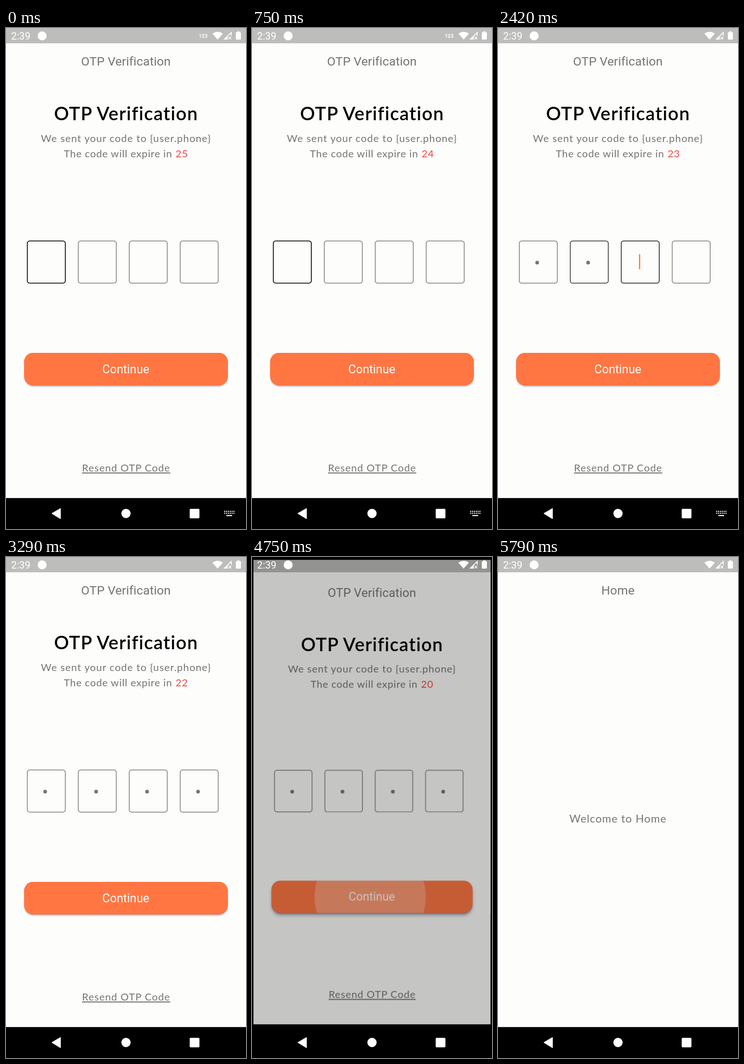
Animation, 518 px wide and 1081 px high, one loop 5.89 s. Source, as an HTML page:

```html
<!DOCTYPE html>
<html lang="en">
<head>
<meta charset="utf-8">
<title>OTP Verification</title>
<style>
html, body { margin: 0; width: 100%; height: 100%; overflow: hidden; background: #000; }
svg { display: block; width: 100%; height: 100%; }

text { fill: #757575; text-anchor: middle; }
.bar { font: 400 26.5px Roboto, sans-serif; letter-spacing: .12px; }
.head { font: 600 40px Lato, sans-serif; letter-spacing: 1.32px; fill: #000; }
.body { font: 400 22px Lato, sans-serif; letter-spacing: 1.1px; }
.body.start { text-anchor: start; letter-spacing: .82px; }
.count text { fill: #f44848; }
.body.link { letter-spacing: 1.02px; text-decoration: underline; }
.welcome { font: 400 23.5px Lato, sans-serif; letter-spacing: 1.1px; }
.button { font: 400 25.5px Roboto, sans-serif; fill: #fff; }
.clock { font: 400 21.6px Roboto, sans-serif; fill: #fff; text-anchor: start; }
.mode { font: 700 11px Roboto, sans-serif; fill: #fff; }
.page { fill: #fdfdfb; }

.fields use { fill: none; stroke: #757575; stroke-width: 1.5; }
.fields .ring { stroke: #000; }
.fields circle { fill: #757575; }
.fields .caret { fill: #ff7643; stroke: none; }

/* every animation spans one 5890 ms loop */
.otp, .home, .scrim, .ripple, .lift, .count text, .ring,
.fields circle, .caret, .mode, .keys {
  animation: 5890ms linear infinite both;
}
.otp, .home { transform-origin: 259px 507.5px; }

/* countdown: one second each */
.count text { animation-name: second; animation-timing-function: step-end; animation-delay: calc(var(--k) * 1000ms - 6180ms); }
@keyframes second { 0% { visibility: visible } 16.978%, 100% { visibility: hidden } }

/* fields: --in is the moment of focus, --key the moment of typing */
.fields circle { animation-name: typed; animation-timing-function: step-end; animation-delay: calc(var(--key) - 5890ms); }
@keyframes typed { 0% { visibility: visible } 48.5%, 100% { visibility: hidden } }

.ring { animation-name: focus; animation-delay: calc(var(--in) - 5890ms); }
@keyframes focus { 0%, 8.7%, 100% { opacity: 0 } 2%, 5.8% { opacity: 1 } }
.caret { animation-name: caret; animation-timing-function: step-end; animation-delay: calc(var(--in) - 5890ms); }
@keyframes caret { 0% { visibility: visible } 5.77%, 100% { visibility: hidden } }

.first .ring { animation-name: focusFirst; animation-delay: 0s; }
@keyframes focusFirst { 0%, 33.96% { opacity: 1 } 36.8%, 100% { opacity: 0 } }
.first .caret { animation-name: blink; animation-delay: 0s; }
@keyframes blink {
  0%, 12.05%, 29.03%, 100% { visibility: hidden }
  3.57%, 20.54% { visibility: visible }
}

.mode { animation-name: modeOff; animation-timing-function: step-end; }
@keyframes modeOff { 0% { visibility: visible } 33.96%, 100% { visibility: hidden } }
.keys { animation-name: keysOff; animation-timing-function: step-end; }
@keyframes keysOff { 0% { visibility: visible } 52.63%, 100% { visibility: hidden } }

/* button press and page change */
.ripple { animation-name: ripple; transform-origin: 255px 736px; }
@keyframes ripple {
  0%, 79.29% { transform: scale(.25); opacity: 0 }
  79.5% { opacity: .27 }
  80.645% { transform: scale(1); opacity: .27 }
  81.9%, 100% { transform: scale(1.7); opacity: .27 }
}
.lift { animation-name: lift; }
@keyframes lift { 0%, 79.29% { opacity: 0 } 80.645%, 100% { opacity: .36 } }
.scrim { animation-name: scrim; }
@keyframes scrim { 0%, 79.63% { opacity: 0 } 80.645% { opacity: .217 } 81.3%, 100% { opacity: .4 } }
.otp { animation-name: leave; }
@keyframes leave {
  0%, 79.63% { transform: scale(1); opacity: 1 }
  80.645% { transform: scale(.988) }
  81.32% { transform: scale(.981) }
  81.9% { opacity: 1 }
  81.91%, 100% { transform: scale(.981); opacity: 0 }
}
.home { animation-name: fade, grow; }
@keyframes fade { 0%, 81.15% { opacity: 0 } 81.83%, 100% { opacity: 1 } }
@keyframes grow {
  0% { transform: scale(.9325) }
  81.15% { transform: scale(.9325); animation-timing-function: cubic-bezier(.2, .8, .3, 1) }
  85.74%, 100% { transform: scale(1) }
}
</style>
</head>
<body>
<svg viewBox="0 0 518 1081">
  <defs>
    <clipPath id="pill"><rect x="39" y="700.5" width="440" height="71" rx="20"/></clipPath>
    <filter id="soft" x="-10%" y="-30%" width="120%" height="160%"><feGaussianBlur stdDeviation="1.6"/></filter>
    <filter id="wide" x="-10%" y="-40%" width="120%" height="180%"><feGaussianBlur stdDeviation="4"/></filter>
    <rect id="box" x="46" y="459.5" width="82" height="91" rx="5"/>
    <rect id="line" x="84.3" y="488" width="2.6" height="32.5"/>
  </defs>
  <rect width="518" height="1081"/>

  <g class="otp">
    <rect class="page" width="518" height="1014.5"/>
    <text class="bar" x="258.8" y="81">OTP Verification</text>
    <text class="head" x="259.2" y="199">OTP Verification</text>
    <text class="body" x="259" y="246">We sent your code to {user.phone}</text>
    <text class="body start" x="124.7" y="279">The code will expire in</text>
    <g class="count">
      <text class="body start" x="366" y="279" style="--k:0">25</text>
      <text class="body start" x="366" y="279" style="--k:1">24</text>
      <text class="body start" x="366" y="279" style="--k:2">23</text>
      <text class="body start" x="366" y="279" style="--k:3">22</text>
      <text class="body start" x="366" y="279" style="--k:4">21</text>
      <text class="body start" x="366" y="279" style="--k:5">20</text>
    </g>

    <g class="fields">
      <g class="first" style="--key:2000ms">
        <use href="#box"/>
        <use href="#box" class="ring"/>
        <circle cx="84.5" cy="506.3" r="4"/>
        <use href="#line" class="caret"/>
      </g>
      <g transform="translate(110)" style="--in:2000ms;--key:2340ms">
        <use href="#box"/>
        <use href="#box" class="ring"/>
        <circle cx="84.5" cy="506.3" r="4"/>
        <use href="#line" class="caret"/>
      </g>
      <g transform="translate(220)" style="--in:2340ms;--key:2680ms">
        <use href="#box"/>
        <use href="#box" class="ring"/>
        <circle cx="84.5" cy="506.3" r="4"/>
        <use href="#line" class="caret"/>
      </g>
      <g transform="translate(330)" style="--in:2680ms;--key:2980ms">
        <use href="#box"/>
        <use href="#box" class="ring"/>
        <circle cx="84.5" cy="506.3" r="4"/>
        <use href="#line" class="caret"/>
      </g>
    </g>

    <rect x="40" y="703" width="438" height="70.5" rx="20" fill="#4a4a78" opacity=".42" filter="url(#soft)"/>
    <g class="lift"><rect x="40" y="706" width="438" height="71" rx="20" fill="#3c3c5a" filter="url(#wide)"/></g>
    <g clip-path="url(#pill)">
      <rect x="39" y="700" width="440" height="72" fill="#ff7643"/>
      <circle class="ripple" cx="255" cy="736" r="120.5" fill="#fff"/>
    </g>
    <text class="button" x="258.5" y="744.5">Continue</text>
    <text class="body link" x="259.3" y="957">Resend OTP Code</text>
    <rect class="scrim" width="518" height="1014.5"/>
  </g>

  <g class="home">
    <rect class="page" width="518" height="1014.5"/>
    <text class="bar" x="259" y="81">Home</text>
    <text class="welcome" x="259" y="573">Welcome to Home</text>
  </g>

  <!-- status bar -->
  <rect width="518" height="33" opacity=".25"/>
  <text class="clock" x="11" y="25">2:39</text>
  <text class="mode" x="425.5" y="20.5">123</text>
  <g fill="#fff">
    <circle cx="78" cy="17" r="9.7"/>
    <path d="M445.5 12.3Q456.7 4 468 12.3L456.7 25Z"/>
    <path d="M469 25L487 7.5V16.5H485V12L478.5 18.5V25Z"/>
    <path d="M480.5 18.8l5.6 5.6m0-5.6l-5.6 5.6" stroke="#fff" stroke-width="1.6"/>
    <path d="M499 7.3h5v1.9h1.6q1.4 0 1.4 1.4v13q0 1.4-1.4 1.4h-8.2q-1.4 0-1.4-1.4v-13q0-1.4 1.4-1.4h1.6z"/>
  </g>

  <!-- navigation bar -->
  <rect y="1014.5" width="518" height="66.5"/>
  <g fill="#fff">
    <path d="M99.5 1047.5L117.5 1037V1058.5Z" stroke="#fff" stroke-width="1.5" stroke-linejoin="round"/>
    <circle cx="259" cy="1047.5" r="10"/>
    <rect x="396.5" y="1037.5" width="21" height="20.5" rx="2"/>
  </g>
  <g class="keys" stroke="#fff" stroke-width="2.3">
    <path d="M471 1043H493M471 1047.2H493" stroke-dasharray="2.2 1.76"/>
    <path d="M475.5 1052H488"/>
  </g>
</svg>
</body>
</html>
```
